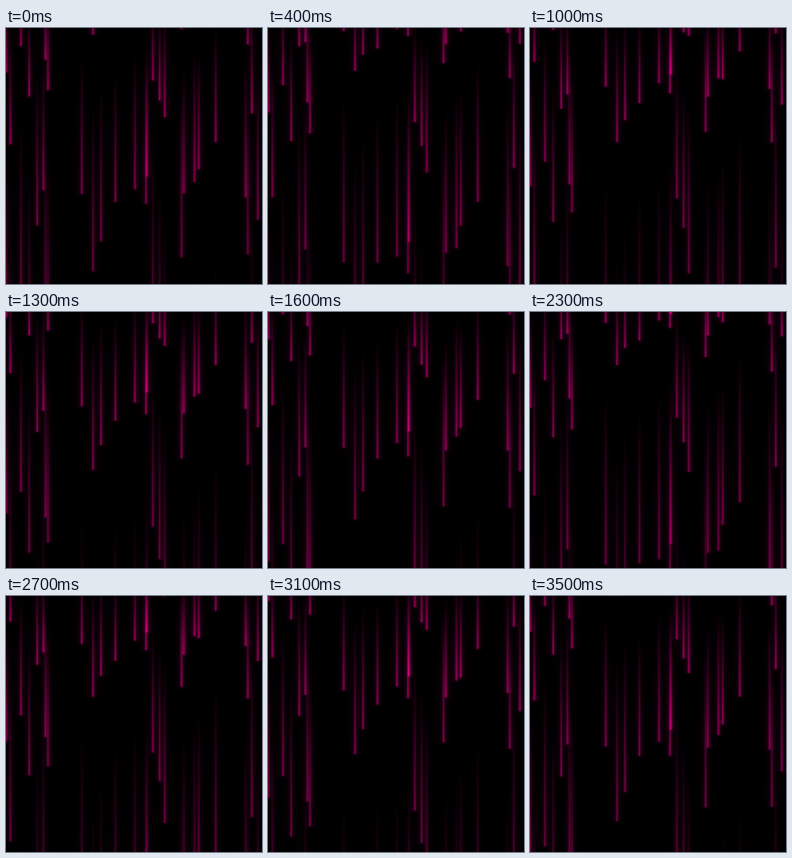
An HTML page with a canvas that plays this animation: 320 by 320 pixels, repeating every 3600 ms.

```html
<!DOCTYPE html>
<html lang="en">
<head>
<meta charset="utf-8">
<title>Falling light</title>
<style>
  html, body { margin: 0; width: 100%; height: 100%; overflow: hidden; background: #000; }
  canvas { display: block; width: 100vw; height: 100vh; }
</style>
</head>
<body>
<canvas id="stage" width="320" height="320"></canvas>
<script>
const ctx = document.getElementById('stage').getContext('2d');
const SIZE = 320, STEP = 100, CYCLE = 18, TRAIL = 11, RISE = 54;

// Two speeds; each key point is a streak's head when the loop begins.
const flights = [
  { rate: .541, heads: [
    [.5, 55], [5.5, 145], [29, 85], [46.7, 202], [52.5, 77], [136.8, 217],
    [183.6, 65], [192, 90], [222.4, 206], [241, 176], [302.3, 20]] },
  { rate: .613, heads: [
    [18.7, 22], [39, 246], [49.3, 39], [94.7, 207], [108.8, 8], [118.8, 266],
    [161.2, 201], [175, 219], [176.3, 185], [198.5, 111], [219.5, 286],
    [235.5, 192], [262.2, 142], [299.5, 211], [307.3, 106], [314.8, 239]] }
];

// Accelerating fall, starting at rest above the stage.
const fall = progress => Math.max(0, progress) ** 2 - RISE;
const progressAt = y => Math.sqrt(y + RISE);

function drawStreak(x, progress, rate) {
  const head = fall(progress), tail = fall(progress - TRAIL * rate);
  if (head < -8 || tail > SIZE) return;
  const strength = Math.max(0, Math.min(1, 1.5 - .04 * progress));
  const gradient = ctx.createLinearGradient(0, tail, 0, head);
  gradient.addColorStop(0, 'rgba(220,0,128,0)');
  gradient.addColorStop(1, 'rgb(220,0,128)');
  ctx.fillStyle = gradient;
  // A narrow core inside ever wider, fainter glows.
  for (let width = 2; width < 22; width *= 1.8) {
    ctx.globalAlpha = .8 * strength / width ** 1.25;
    ctx.beginPath();
    ctx.roundRect(x - width / 2, tail, width, head - tail + width / 4, width / 2);
    ctx.fill();
  }
}

function draw(time) {
  const step = Math.floor(time / STEP) % CYCLE;
  ctx.globalCompositeOperation = 'source-over';
  ctx.globalAlpha = 1;
  ctx.fillStyle = '#000';
  ctx.fillRect(0, 0, SIZE, SIZE);
  ctx.globalCompositeOperation = 'lighter';
  for (const { rate, heads } of flights) {
    for (const [x, y] of heads) {
      for (let lap = -2; lap <= 2; lap++) {
        drawStreak(x, progressAt(y) + rate * (step + lap * CYCLE), rate);
      }
    }
  }
}

const begin = performance.now();
function tick() {
  draw(performance.now() - begin);
  requestAnimationFrame(tick);
}
tick();
</script>
</body>
</html>
```
